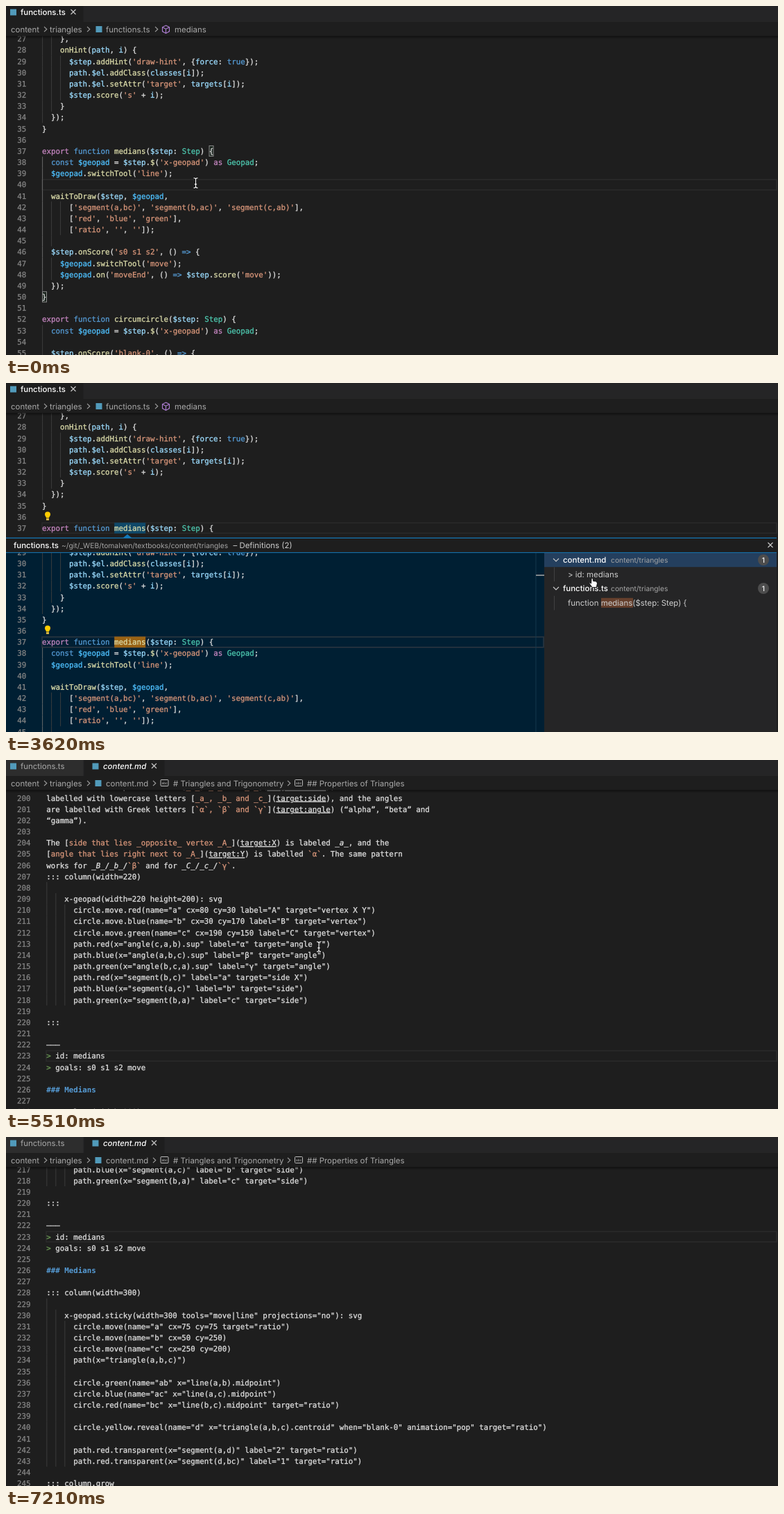
An HTML page for the animation above (7600 ms loop, 1113 by 503 pixels).

```html
<!DOCTYPE html>
<html lang="en">
<head>
<meta charset="utf-8">
<title>Peek definition</title>
<style>
  html, body { margin: 0; width: 100%; height: 100%; overflow: hidden; background: #1e1e1e; }
  svg { display: block; }
  text { white-space: pre; text-rendering: geometricPrecision; }
  .code { font: 10.8px "DejaVu Sans Mono", monospace; color: #e0e0e0; }
  .code, .code tspan { fill: currentColor; stroke: currentColor; stroke-width: .28px; }
  .num { color: #858585; text-anchor: end; }
  .ui { font: 11.45px Inter, sans-serif; fill: #ccc; }
  .dim { fill: #a9a9a9; }
  .small { font-size: 10.3px; fill: #a5a5a5; }
  .name { font-weight: 500; fill: #fff; }
  .str { color: #d8967a; } .ctl { color: #c586c0; } .kw { color: #569cd6; }
  .type { color: #4ec9b0; } .const { color: #4fc1ff; } .fn { color: #dcdcaa; }
  .var { color: #9cdcfe; } .quote { color: #6a9955; }
  .code .head { color: #569cd6; font-weight: bold; stroke: none; }
  .link { text-decoration: underline 1px; text-underline-offset: 2.5px; }
  .em { font-style: italic; }
  .line { fill: none; stroke: #ccc; stroke-width: 1.1; }
</style>
</head>
<body>
<svg id="stage" width="1113" height="503" viewBox="0 0 1113 503"></svg>
<script>
const LOOP = 7600, ROW = 16.17, COL = 6.5;

const tsSource = `    },
    onHint(path, i) {
      $step.addHint('draw-hint', {force: true});
      path.$el.addClass(classes[i]);
      path.$el.setAttr('target', targets[i]);
      $step.score('s' + i);
    }
  });
}

export function medians($step: Step) {
  const $geopad = $step.$('x-geopad') as Geopad;
  $geopad.switchTool('line');

  waitToDraw($step, $geopad,
      ['segment(a,bc)', 'segment(b,ac)', 'segment(c,ab)'],
      ['red', 'blue', 'green'],
      ['ratio', '', '']);

  $step.onScore('s0 s1 s2', () => {
    $geopad.switchTool('move');
    $geopad.on('moveEnd', () => $step.score('move'));
  });
}

export function circumcircle($step: Step) {
  const $geopad = $step.$('x-geopad') as Geopad;

  $step.onScore('blank-0', () => {`;

const mdSource = `vertices of a shape are named [_A_, _B_ and _C_](target:vertex), the sides are
labelled with lowercase letters [_a_, _b_ and _c_](target:side), and the angles
are labelled with Greek letters [\`α\`, \`β\` and \`γ\`](target:angle) (“alpha”, “beta” and
“gamma”).

The [side that lies _opposite_ vertex _A_](target:X) is labeled _a_, and the
[angle that lies right next to _A_](target:Y) is labelled \`α\`. The same pattern
works for _B_/_b_/\`β\` and for _C_/_c_/\`γ\`.
::: column(width=220)

    x-geopad(width=220 height=200): svg
      circle.move.red(name="a" cx=80 cy=30 label="A" target="vertex X Y")
      circle.move.blue(name="b" cx=30 cy=170 label="B" target="vertex")
      circle.move.green(name="c" cx=190 cy=150 label="C" target="vertex")
      path.red(x="angle(c,a,b).sup" label="α" target="angle Y")
      path.blue(x="angle(a,b,c).sup" label="β" target="angle")
      path.green(x="angle(b,c,a).sup" label="γ" target="angle")
      path.red(x="segment(b,c)" label="a" target="side X")
      path.blue(x="segment(a,c)" label="b" target="side")
      path.green(x="segment(b,a)" label="c" target="side")

:::

–––
> id: medians
> goals: s0 s1 s2 move

### Medians

::: column(width=300)

    x-geopad.sticky(width=300 tools="move|line" projections="no"): svg
      circle.move(name="a" cx=75 cy=75 target="ratio")
      circle.move(name="b" cx=50 cy=250)
      circle.move(name="c" cx=250 cy=200)
      path(x="triangle(a,b,c)")

      circle.green(name="ab" x="line(a,b).midpoint")
      circle.blue(name="ac" x="line(a,c).midpoint")
      circle.red(name="bc" x="line(b,c).midpoint" target="ratio")

      circle.yellow.reveal(name="d" x="triangle(a,b,c).centroid" when="blank-0" animation="pop" target="ratio")

      path.red.transparent(x="segment(a,d)" label="2" target="ratio")
      path.red.transparent(x="segment(d,bc)" label="1" target="ratio")

::: column.grow`;

const ts = {
  lines: tsSource.split('\n'), first: 27, home: 37, x: 52, numX: 29.3, closeGap: 1,
  rule: /('[^']*')|(\b(?:export|as)\b)|(\b(?:function|const|true)\b|=>)|(\b(?:Step|Geopad)\b)|(\$geopad\b)|(\$(?=\()|\w+(?=\())|(\$?[A-Za-z]\w*)/g,
  styles: ['str', 'ctl', 'kw', 'type', 'const', 'fn', 'var']
};
const md = {
  lines: mdSource.split('\n'), first: 199, home: 223, x: 58.2, numX: 35.6, closeGap: 0,
  rule: /^(###.*)|^(>)|(?<=\[)([^\]]+)(?=\]\()|(`[^`]+`)|(?<=\]\()([^)]+)|(_\w+_)/g,
  styles: ['head', 'quote', 'str', 'str', 'link', 'em']
};

const rect = (x, y, w, h, fill, more = '') =>
  `<rect x="${x}" y="${y}" width="${w}" height="${h}" fill="${fill}" ${more}/>`;
const path = (d, more = 'class="line"') => `<path d="${d}" ${more}/>`;
const ui = (x, y, s, cls = '') => `<text class="ui ${cls}" x="${x}" y="${y + 4.1}">${s}</text>`;
const group = (id, body) => `<g id="${id}">${body}</g>`;
const cross = (x, y) => path(`M${x - 3.5} ${y - 3.5}l7 7m0-7l-7 7`);
const chevron = (x, y) => path(`M${x - 2} ${y - 3.7}l3.8 3.7l-3.8 3.7`, 'class="line" stroke-opacity=".75"');
const chevronDown = (x, y) => path(`M${x - 4} ${y - 2}l4 4l4-4`);
const fileIcon = (x, y) => rect(x - 4.5, y - 4.5, 9, 9, '#519aba');
const rowBox = (x, y, w, stroke) =>
  rect(x, y - 7.4, w, 14.9, 'none', `stroke="${stroke}" stroke-width="1.6"`);

function highlight(line, { rule, styles }) {
  let out = '', end = 0;
  for (const m of line.matchAll(rule)) {
    const style = styles[m.slice(1).findIndex(g => g !== undefined)];
    out += line.slice(end, m.index) + `<tspan class="${style}">${m[0]}</tspan>`;
    end = m.index + m[0].length;
  }
  return out + line.slice(end);
}

// Blank lines take their guides from the nearest lines around them.
function guideCount(lines, i, closeGap) {
  const depth = s => s.search(/\S/) >> 1;
  if (lines[i]) return depth(lines[i]);
  const up = depth(lines.slice(0, i).reverse().find(Boolean) || 'x');
  const down = depth(lines.slice(i).find(Boolean) || 'x');
  return up < down ? up + 1 : up === down ? up : down + closeGap;
}

function listing(doc, from = 0, to = 999) {
  return doc.lines.map((line, i) => {
    const n = doc.first + i, y = (n - doc.home) * ROW;
    if (n < from || n > to) return '';
    let out = '';
    for (let k = 0; k < guideCount(doc.lines, i, doc.closeGap); k++) {
      const active = doc === ts && k === 0 && n > 37 && n < 50;
      out += rect(doc.x + .2 + k * 2 * COL, y - 8.1, .9, ROW, active ? '#707070' : '#404040');
    }
    const pad = Math.max(0, line.search(/\S/));
    return out + `<text class="code num" x="${doc.numX}" y="${y + 3.9}">${n}</text>` +
      `<text class="code" x="${doc.x + pad * COL}" y="${y + 3.9}">${highlight(line.trim(), doc)}</text>`;
  }).join('');
}

const at = (y, body) => `<g transform="translate(0 ${y})">${body}</g>`;
const bulb = (x, y) =>
  path(`M${x - 2} ${y + 2.4}C${x - 2} ${y + .8} ${x - 4} ${y} ${x - 4} ${y - 2.4}a4 4 0 0 1 8 0C${x + 4} ${y} ${x + 2} ${y + .8} ${x + 2} ${y + 2.4}z`, 'fill="#ffcc00"') +
  rect(x - 2, y + 3.2, 4, 2.6, '#e8c24a');

const tabsTs = rect(0, 0, 1113, 23, '#252526') + rect(0, 0, 111.5, 23, '#1e1e1e') +
  fileIcon(10.5, 9) + ui(21, 9, 'functions.ts', 'name') + cross(97, 8.5);
const tabsMd = rect(0, 0, 1113, 23, '#252526') + rect(0, 0, 111.5, 23, '#2d2d2d') +
  rect(112.5, 0, 116, 23, '#1e1e1e') + fileIcon(10.5, 9) + ui(21, 9, 'functions.ts', 'dim') +
  fileIcon(129, 9) + ui(140, 9, 'content.md', 'name em') + cross(213.5, 8.5);
const symbol = x => rect(x, 28.5, 11, 9, 'none', 'stroke="#bbb" rx="1"') +
  `<text x="${x + 1.6}" y="35" font-family="Inter, sans-serif" font-size="4.6" fill="#ccc">abc</text>`;
const crumbs = rect(0, 23, 1113, 20.5, '#1e1e1e') + ui(7, 33.5, 'content', 'dim') + chevron(57, 33.5) +
  ui(63, 33.5, 'triangles', 'dim') + chevron(119, 33.5);
const crumbsTs = crumbs + fileIcon(134, 33.5) + ui(144, 33.5, 'functions.ts', 'dim') + chevron(217, 33.5) +
  path('M230.5 28l5 2.6v6l-5 2.8l-5-2.8v-6zM225.5 30.6l5 2.6l5-2.6M230.5 33.2v6', 'class="line" style="stroke:#b180d7"') +
  ui(243, 33.5, 'medians', 'dim');
const crumbsMd = crumbs + fileIcon(133, 33.5) + ui(144, 33.5, 'content.md', 'dim') + chevron(214, 33.5) +
  symbol(223) + ui(241, 33.5, '# Triangles and Trigonometry', 'dim') + chevron(408, 33.5) +
  symbol(416.5) + ui(434, 33.5, '## Properties of Triangles', 'dim');
const shadow = rect(0, 43.3, 1113, 1.2, '#000', 'opacity=".55"') + rect(0, 44.5, 1113, 2, '#000', 'opacity=".2"');

const fileRow = (y, name, open) => (open ? chevronDown : chevron)(793, y) + ui(803, y, name, 'name') +
  ui(872, y, 'content/triangles', 'small') + `<circle cx="1092" cy="${y}" r="8" fill="#4d4d4d"/>` +
  ui(1089.7, y - .3, '1', 'small name');
const guide = y => rect(790, y - 10, .9, 20.6, '#454545');
const resultRow = y => guide(y) + rect(858, y - 7, 46, 14, '#653f2c') +
  ui(810, y, 'function medians($step: Step) {');
const header = (name, pathX, restX) => ui(11, 234, name, 'name') +
  ui(pathX, 234, '~/git/_WEB/tomalven/textbooks/content/triangles', 'small') +
  ui(restX, 234, '– Definitions (2)');

const peek = rect(0, 217.3, 1111, 6, '#1e1e1e') + rect(0, 223, 1111, 280, '#001f33') +
  rowBox(52, 373.4, 723, '#2b3640') +
  group('peekTs', rect(156.2, 365.5, 45, 15.8, '#996214') + at(373.4, listing(ts, 29, 45))) +
  group('peekBulb', bulb(60, 356)) +
  group('peekMd', at(373.4, listing(md, 215, 231)) + rect(764, 278, 12, 16, '#4a5f6e')) +
  rect(763.5, 244, .9, 259, '#173a50') + rect(764, 276.3, 12, 1.6, '#a0a0a0') +
  rect(776, 244, 335, 259, '#252526') + group('picked', rect(776, 244.6, 335, 20.6, '#243f5e')) +
  group('treeShort', fileRow(255, 'content.md', false) + fileRow(275.5, 'functions.ts', true) + resultRow(296)) +
  group('treeFull', fileRow(255, 'content.md', true) + guide(275.5) + ui(810, 275.5, '&gt; id: medians') +
    fileRow(296, 'functions.ts', true) + resultRow(316.8)) +
  rect(0, 223, 1111, 21.5, '#1e1e1e') + group('headTs', header('functions.ts', 80, 327.5)) +
  group('headMd', header('content.md', 78, 325.5)) + cross(1102, 233.5) +
  rect(0, 222.8, 1111, 1.2, '#1478b8') + rect(0, 243.9, 1111, 1, '#1478b8') +
  path('M169 223l6-5l6 5z', 'fill="#1478b8"');

const bracket = (x, y) => rect(x, y - 7.5, 6, 15, '#17301f', 'fill-opacity=".4" stroke="#888"');
const beam = 'M-3-7.2q3 0 3 2q0-2 3-2M0-5.2V5.2M-3 7.2q3 0 3-2q0 2 3 2M-1.7 1.8h3.4';
const hand = 'M-2.4-6.6q1.6-.9 2 .6l.7 3.6q3.6-.3 5 1.2q1.2 1.6.2 4.4l-.8 3.4h-6l-3.6-4.8q-1.5-2.2.3-2.2l1.6 1.4z';

document.getElementById('stage').innerHTML = rect(0, 0, 1113, 503, '#1e1e1e') +
  group('mainTs',
    group('line40', rowBox(52, 257.6, 1059, '#2a2a2a') + bracket(293, 209) + bracket(52.5, 419.2)) +
    group('line37', rowBox(52, 209, 1059, '#2a2a2a')) +
    group('word', rect(156.2, 201.3, 45, 15.6, '#0f4868')) +
    at(209, listing(ts)) + group('mainBulb', bulb(60, 192)) + tabsTs + crumbsTs + shadow) +
  group('mainMd',
    group('scroller', rowBox(58, 0, 1053, '#2a2a2a') + listing(md) +
      group('caret', rect(58.2, -8, 1.8, 16, '#aeafad'))) + tabsMd + crumbsMd + shadow) +
  group('peek', peek) +
  group('pointer',
    group('beam', path(beam, 'fill="none" stroke="#000" stroke-width="2.6"') + path(beam, 'fill="none" stroke="#fff" stroke-width="1.2"')) +
    group('hand', path(hand, 'fill="#fff" stroke="#000" stroke-width=".9"')));

const $ = id => document.getElementById(id);
const show = (id, on) => { $(id).style.display = on ? '' : 'none'; };
const move = (id, x, y) => $(id).setAttribute('transform', `translate(${x} ${y})`);
const latest = (keys, t) => keys.filter(k => k[0] <= t).pop();

const pointerKeys = [
  [0, 273.5, 255], [80, 263, 249], [230, 257, 245], [320, 248, 239], [410, 237, 233], [500, 224, 226],
  [580, 210, 220], [670, 196, 214], [760, 184, 210], [840, 175.5, 208], [2140, 440, 240], [2220, 719, 262],
  [2400, 770, 262], [2490, 835, 264], [2580, 880, 267], [2660, 890, 270], [2740, 870, 267], [2830, 850, 263],
  [3180, 848, 276], [3270, 847, 290], [3530, 847, 289], [3620, 846.5, 288], [4620, 844, 283],
  [4970, 740, 279], [5060, 560, 272], [5150, 451, 269], [6640, 534, 289], [6790, 868, 420], [6940, 970, 482]
];
const scrollKeys = [
  [0, 437], [5510, 426.5], [5600, 370], [5780, 225], [5930, 193], [6410, 186], [6490, 162], [6640, 143.7]
];

function render(t) {
  const within = (a, b) => t >= a && t < b;
  const opened = t >= 4730, mdPeek = t >= 4060, expanded = t >= 3010;
  show('mainTs', !opened);
  show('mainMd', opened);
  show('line40', t < 930);
  show('line37', t >= 930);
  show('word', t >= 1020);
  show('mainBulb', t >= 1110);

  show('peek', within(1470, 4730));
  show('peekTs', !mdPeek);
  show('headTs', !mdPeek);
  show('peekMd', mdPeek);
  show('headMd', mdPeek);
  show('peekBulb', within(2140, 4060));
  show('treeShort', !expanded);
  show('treeFull', expanded);
  move('picked', 0, 20.6 * (t >= 3970 ? 1 : expanded ? 0 : 2));

  move('scroller', 0, latest(scrollKeys, t)[1]);
  show('caret', within(4730, 5150) || within(5600, 6170) || within(6640, 7210));

  const [, x, y] = latest(pointerKeys, t), pointing = within(2400, 4620);
  move('pointer', x, y);
  show('pointer', t < 7030);
  show('beam', !pointing);
  show('hand', pointing);
}

function tick() {
  render(performance.now() % LOOP);
  requestAnimationFrame(tick);
}
tick();
</script>
</body>
</html>
```
